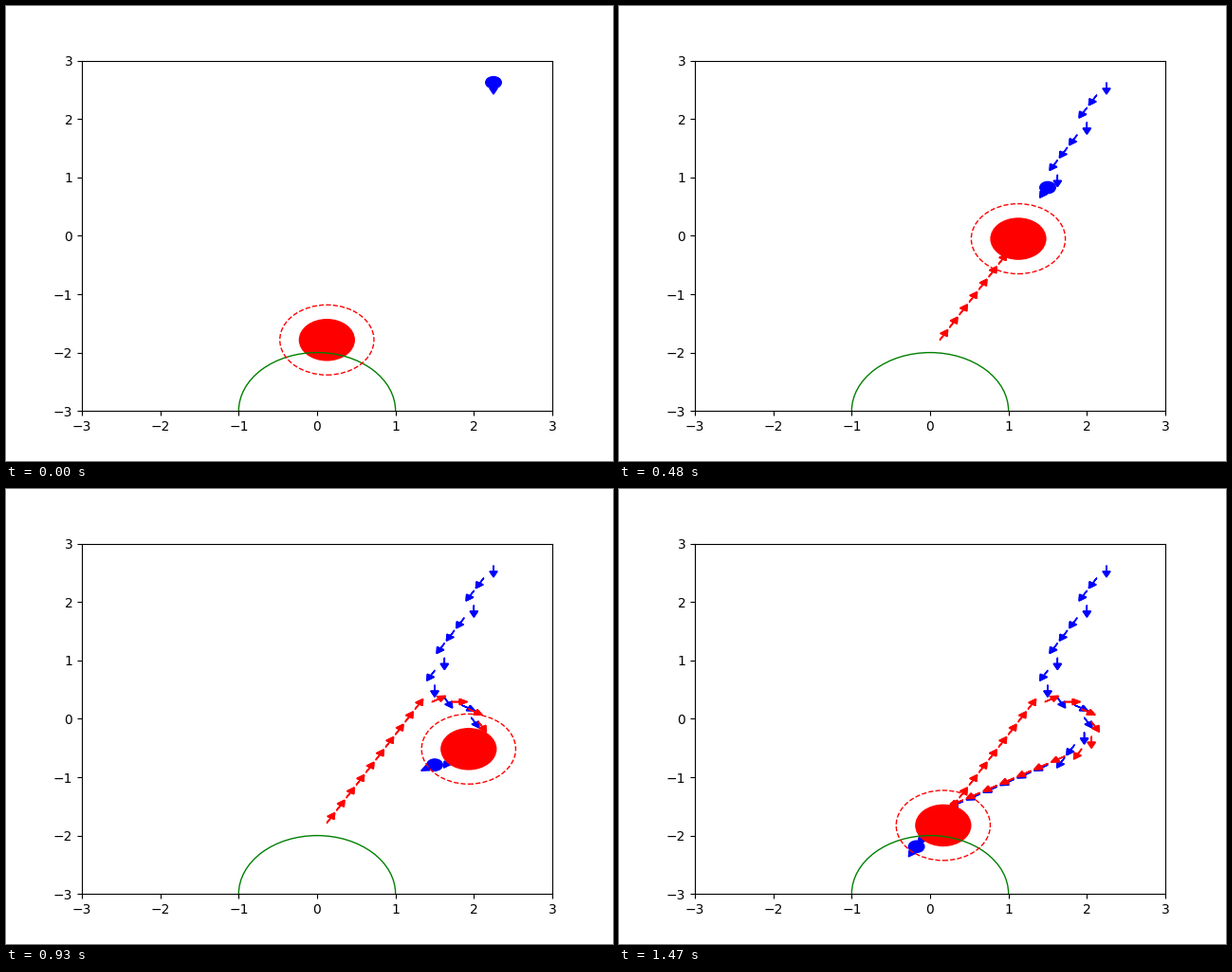
A matplotlib script that plays this animation: 640 by 480 pixels, repeating every 1.5 s.

```python
import numpy as np
import matplotlib.pyplot as plt
from matplotlib.animation import FuncAnimation

FRAMES = 50
INTERVAL = 30

GOAL = -3j      # centre of the green zone, as a complex position
STEP = 0.25
TURN = 30       # headings are multiples of this; also the most one step turns
FEAR = 1.0      # distance at which blue starts to flee
VEER = 6.14     # how far blue leans off the straight line to its goal


def bearing(start, end):
    return np.degrees(np.angle(end - start))


def wrap(angle):
    return (angle + 180) % 360 - 180


def unit(heading):
    return np.exp(1j * np.radians(heading))


def steer(heading, wish):
    """Turn towards the wished angle, rounded and limited to one notch."""
    turn = wrap(TURN * round(wish / TURN) - heading)
    return heading + np.clip(turn, -TURN, TURN)


def blue_wish(blue, red, red_heading):
    to_goal = bearing(blue, GOAL)
    if abs(blue - red) > FEAR:
        return to_goal + VEER
    flee = bearing(red, blue)
    return (flee + 0.26 * wrap(to_goal - flee)
            + 0.12 * wrap(red_heading - flee))


def chase():
    """Let blue run for the goal with red after it; return both trails."""
    blue, blue_heading = 2.25 + 2.875j, 270
    red, red_heading = -2j, 60
    blues, reds = [], []
    for _ in range(FRAMES // 2 + 1):
        blue_heading = steer(blue_heading, blue_wish(blue, red, red_heading))
        blue += STEP * unit(blue_heading)
        blues.append((blue, blue_heading))
        red_heading = steer(red_heading, bearing(red, blue))
        red += STEP * unit(red_heading)
        reds.append((red, red_heading))
    return blues, reds


# The two take turns: blue moves on odd frames, red on even ones
blues, reds = chase()
blue_at = [blues[(n + 1) // 2] for n in range(FRAMES)]
red_at = [reds[n // 2] for n in range(FRAMES)]

fig, ax = plt.subplots(figsize=(6.4, 4.8), dpi=100)
ax.set_xlim(-3, 3)
ax.set_ylim(-3, 3)


def xy(z):
    return z.real, z.imag


def add_trail(states, color):
    """Leave one arrow per frame, also when standing still."""
    return [ax.arrow(*xy(pos), *xy(0.1 * unit(heading)), head_width=0.1,
                     head_length=0.1, color=color)
            for pos, heading in states]


def add_circle(center, radius, color, **style):
    return ax.add_patch(plt.Circle(xy(center), radius, color=color, **style))


trails = [add_trail(blue_at, "b"), add_trail(red_at, "r")]
blue_dot = add_circle(blue_at[0][0], 0.1, "b")
red_dot = add_circle(red_at[0][0], 0.35, "r")
add_circle(GOAL, 1, "g", fill=False)
red_ring = add_circle(red_at[0][0], 0.6, "r", fill=False, linestyle="--")


def update(frame):
    for trail in trails:
        for n, arrow in enumerate(trail):
            arrow.set_visible(n <= frame)
    blue_dot.center = xy(blue_at[frame][0])
    red_dot.center = red_ring.center = xy(red_at[frame][0])
    return []


anim = FuncAnimation(fig, update, frames=FRAMES, interval=INTERVAL,
                     init_func=lambda: update(0), repeat=True)
plt.show()
```
